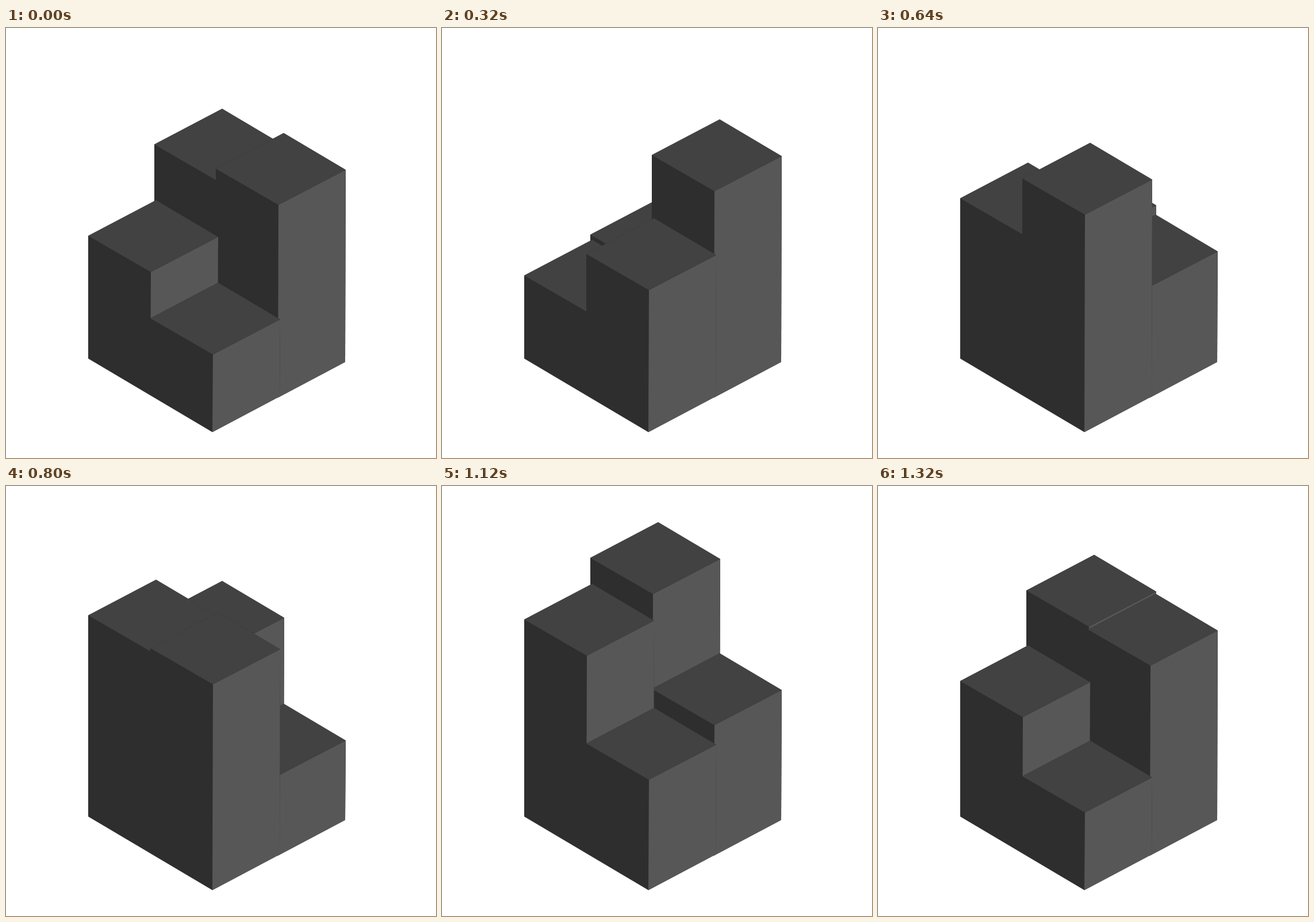
Recreate the animation shown at these times as an HTML page with a canvas. Size 748x748 px, loop 1360 ms.

```html
<!DOCTYPE html>
<html lang="en">
<head>
<meta charset="utf-8">
<title>Moving columns</title>
<style>
  html, body { margin: 0; width: 100%; height: 100%; overflow: hidden; background: #fff; }
  canvas { display: block; width: 748px; height: 748px; }
</style>
</head>
<body>
<canvas id="stage" width="748" height="748"></canvas>
<script>
const ctx = document.getElementById('stage').getContext('2d');
const LOOP = 1360, STEP = 40;
const TOP = '#424242', LEFT = '#2e2e2e', RIGHT = '#575757';

// x: rear corner, base: its height on the ground, low/high: its travel.
// keys alternate between the two ends; listed back to front.
const columns = [
  { x: 376, base: 452, low: 308,   high: 63,    keys: [[-240, 1], [400, 0], [1120, 1], [1760, 0]] },
  { x: 483, base: 517, low: 381.5, high: 136.5, keys: [[-520, 0], [200, 1], [840, 0], [1520, 1]] },
  { x: 261, base: 513, low: 377,   high: 132,   keys: [[-400, 1], [240, 0], [960, 1], [1600, 0]] },
  { x: 369, base: 577, low: 443,   high: 197.3, keys: [[0, 0], [680, 1], [1320, 0], [1360, 0]] }
];

const smooth = u => u * u * (3 - 2 * u);

function lift(keys, t) {
  let i = 0;
  while (i < keys.length - 2 && t >= keys[i + 1][0]) i++;
  const [t0, v0] = keys[i], [t1, v1] = keys[i + 1];
  return v0 + (v1 - v0) * smooth((t - t0) / (t1 - t0));
}

function fill(color, ...points) {
  ctx.fillStyle = color;
  ctx.beginPath();
  for (const [x, y] of points) ctx.lineTo(x, y);
  ctx.closePath();
  ctx.fill();
}

function drawColumn({ x, base, low, high, keys }, t) {
  const y = low + (high - low) * lift(keys, t);
  const back = [x, y], left = [x - 118, y + 62];
  const front = [x - 9, y + 125], right = [x + 108, y + 64];
  const leftFoot = [x - 118, base + 62];
  const frontFoot = [x - 10, base + 126];
  const rightFoot = [x + 107, base + 64];
  // Dark silhouette first, so no background shows between faces.
  fill(LEFT, back, right, rightFoot, frontFoot, leftFoot, left);
  fill(RIGHT, front, right, rightFoot, frontFoot);
  fill(TOP, back, right, front, left);
}

function draw(time) {
  const t = Math.floor((time % LOOP) / STEP) * STEP;
  ctx.fillStyle = '#fff';
  ctx.fillRect(0, 0, 748, 748);
  for (const column of columns) drawColumn(column, t);
}

const start = performance.now();
function tick() {
  draw(performance.now() - start);
  requestAnimationFrame(tick);
}
tick();
</script>
</body>
</html>
```
